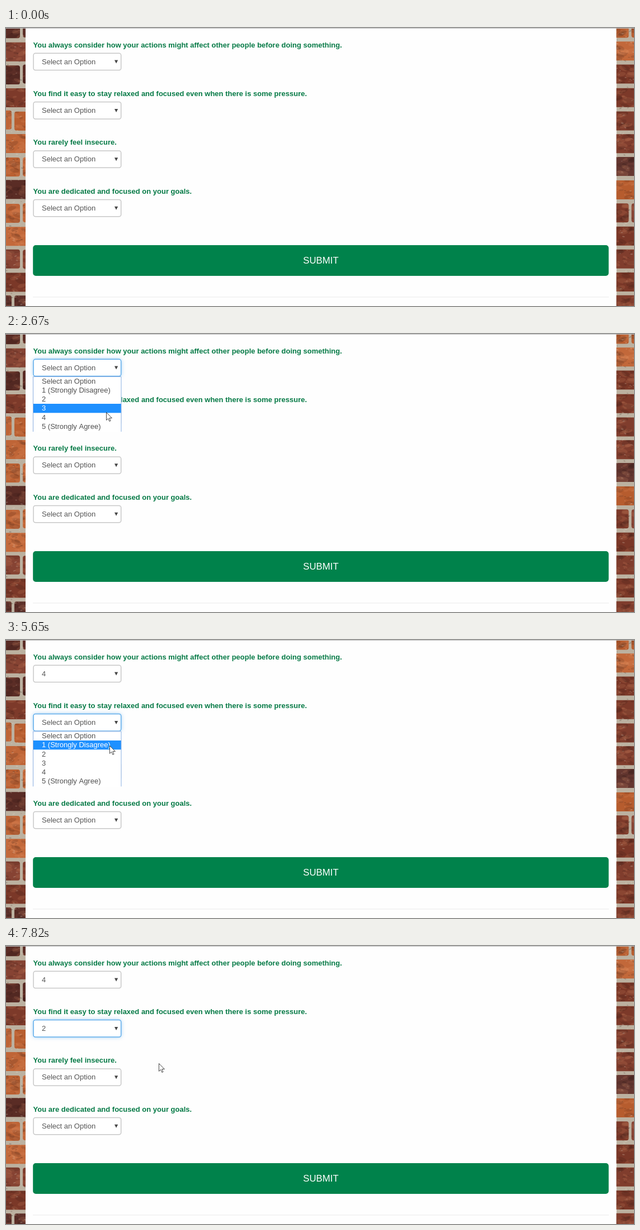
These frames come from a looping animation (1123 by 498 pixels, 8 s). An HTML page with a canvas:

```html
<!DOCTYPE html>
<html lang="en">
<head>
<meta charset="utf-8">
<title>Questionnaire</title>
<style>
html, body { margin: 0; height: 100%; overflow: hidden; background: #fefefe }
canvas { display: block }
</style>
</head>
<body>
<canvas id="stage" width="1123" height="498"></canvas>
<script>
const W = 1123, H = 498, LOOP = 8000, STEP = 80;
const ctx = document.getElementById('stage').getContext('2d');
const font = '13px "Liberation Sans", Arial, sans-serif';

const questions = [
  'You always consider how your actions might affect other people before doing something.',
  'You find it easy to stay relaxed and focused even when there is some pressure.',
  'You rarely feel insecure.',
  'You are dedicated and focused on your goals.'
];
const options = ['Select an Option', '1 (Strongly Disagree)', '2', '3', '4', '5 (Strongly Agree)'];
const rowHeight = 16.25;
const selectTop = i => 44.5 + i * 87.4;

const visits = [
  { open: 1610, close: 3450, blur: 4790, answer: 4 },
  { open: 4790, close: 7430, blur: LOOP, answer: 2 }
];

// Where the pointer turns or rests
const path = [
  { t: 180, x: 990, y: 452 },
  { t: 660, x: 310, y: -20 },
  { t: 800, x: 215, y: -20 },
  { t: 810, x: 215, y: 5 },
  { t: 1610, x: 196, y: 59 },
  { t: 1900, x: 196, y: 59 },
  { t: 2670, x: 179, y: 140 },
  { t: 3150, x: 178, y: 145 },
  { t: 4000, x: 178, y: 145 },
  { t: 4470, x: 187, y: 149 },
  { t: 5090, x: 187, y: 149 },
  { t: 6180, x: 183, y: 226 },
  { t: 6810, x: 175, y: 206 },
  { t: 7580, x: 175, y: 206 },
  { t: 7740, x: 235, y: 227 },
  { t: 7820, x: 273, y: 210 }
];

const clamp = v => Math.max(0, Math.min(1, v));
const mix = (a, b, k) => a + (b - a) * k;
const smooth = k => k * k * (3 - 2 * k);

function pointerAt(t) {
  const i = path.findLastIndex(p => p.t <= t);
  if (i < 0) return null;
  const a = path[i], b = path[i + 1] || a;
  const elapsed = Math.floor((t - a.t) / STEP) * STEP;
  const k = smooth(clamp(elapsed / (b.t - a.t || 1)));
  return { x: mix(a.x, b.x, k), y: mix(a.y, b.y, k) };
}

function text(c, string, x, y, color, style = font) {
  c.font = style;
  c.fillStyle = color;
  c.fillText(string, x, y);
}

// One letter per course: d dark, r red, o orange
const brickColors = { d: [98, 52, 45], r: [128, 61, 45], o: [190, 100, 54] };

function drawBricks(c, left, width, courses, jointAt) {
  let seed = left + 7;
  const random = () => (seed = (seed * 16807 + 11) % 2147483647) / 2147483647;
  const blotch = (color, x, y, size) => {
    c.fillStyle = color;
    c.beginPath();
    c.ellipse(x, y, size, size * 0.45, random() - 0.5, 0, 7);
    c.fill();
  };
  c.save();
  c.beginPath();
  c.rect(left, 0, width, H);
  c.clip();
  c.fillStyle = '#bcb1a0';
  c.fillRect(left, 0, width, H);
  [...courses].forEach((kind, i) => {
    const y = -17.5 + i * 41.3, joint = jointAt(i);
    const spans = joint ? [[-6, joint], [joint + 5, width + 6]] : [[-6, width + 6]];
    for (const [a, b] of spans) {
      const shade = (random() - 0.5) * 16;
      c.save();
      c.beginPath();
      c.roundRect(left + a, y + random() * 2, b - a, 34, 4);
      c.fillStyle = `rgb(${brickColors[kind].map(v => v + shade)})`;
      c.fill();
      c.clip();
      for (let n = 0; n < 14; n++)
        blotch(n % 2 ? 'rgba(30,10,10,.13)' : 'rgba(240,160,115,.13)',
          left + random() * width, y + random() * 34, 2 + random() * 9);
      c.restore();
    }
  });
  for (let n = 0; n < 120; n++)
    blotch(n % 2 ? 'rgba(60,40,30,.25)' : 'rgba(235,225,205,.25)',
      left + random() * width, random() * H, 1 + random() * 1.5);
  c.restore();
}

function drawPage(c) {
  c.fillStyle = '#fefefe';
  c.fillRect(0, 0, W, H);
  drawBricks(c, 0, 35, 'drdrooodoorrd', i => i % 2 ? 0 : i % 8 === 4 ? 10 : 25);
  drawBricks(c, 1091.5, 31.5, 'oorrrrdorrrrr', i => i % 8 ? 0 : 22);
  c.fillStyle = '#bdbdbd';
  c.fillRect(0, 0, W, 1);
  c.fillStyle = '#ececec';
  c.fillRect(48, 481.5, 1030, 1);
  questions.forEach((q, i) => text(c, q, 48.5, selectTop(i) - 10, '#067a46', 'bold ' + font));
  c.fillStyle = '#00824b';
  c.beginPath();
  c.roundRect(48.2, 389, 1029.5, 55, 5);
  c.fill();
  c.textAlign = 'center';
  text(c, 'SUBMIT', 563, 422, '#fff', font.replace('13px', '16.8px'));
  c.textAlign = 'left';
}

function drawSelect(i, value, focus) {
  const y = selectTop(i);
  const box = new Path2D();
  box.roundRect(49.1, y + 0.7, 156.6, 30.3, 3.5);
  ctx.save();
  ctx.fillStyle = '#fff';
  ctx.shadowColor = `rgba(102,175,233,${0.7 * focus})`;
  ctx.shadowBlur = 7;
  ctx.fill(box);
  ctx.restore();
  ctx.lineWidth = 1.5;
  ctx.strokeStyle = `rgb(${mix(200, 98, focus)},${mix(200, 174, focus)},${mix(200, 235, focus)})`;
  ctx.stroke(box);
  text(ctx, options[value], 64, y + 20.1, '#555');
  ctx.fillStyle = '#444';
  ctx.beginPath();
  ctx.moveTo(194, y + 13);
  ctx.lineTo(200.2, y + 13);
  ctx.lineTo(197.1, y + 19);
  ctx.fill();
}

function drawList(i, pointer) {
  const top = selectTop(i) + 32;
  const hovered = Math.max(0, Math.floor((pointer.y - top) / rowHeight));
  ctx.fillStyle = '#fff';
  ctx.fillRect(48, top - 0.5, 158.5, 99);
  ctx.fillStyle = '#1e90ff';
  ctx.fillRect(49, Math.round(top + hovered * rowHeight), 157, 16.3);
  options.forEach((option, n) =>
    text(ctx, option, 64, Math.round(top + 12.2 + n * rowHeight), n === hovered ? '#fff' : '#505050'));
  ctx.strokeStyle = '#8aaee0';
  ctx.lineWidth = 1;
  ctx.beginPath();
  ctx.moveTo(48.5, top + 98.5);
  ctx.lineTo(48.5, top);
  ctx.lineTo(206, top);
  ctx.lineTo(206, top + 98.5);
  ctx.stroke();
}

const arrow = new Path2D('M.5 .5V14.4L3.7 11.4L5.9 16.4L8 15.5L5.9 10.6H10.4Z');

function drawPointer({ x, y }) {
  ctx.save();
  ctx.translate(Math.round(x), Math.round(y));
  ctx.fillStyle = '#fff';
  ctx.fill(arrow);
  ctx.strokeStyle = '#333';
  ctx.lineWidth = 0.9;
  ctx.stroke(arrow);
  ctx.restore();
}

const page = document.createElement('canvas');
page.width = W;
page.height = H;
drawPage(page.getContext('2d'));

function draw() {
  const t = performance.now() % LOOP, pointer = pointerAt(t);
  ctx.drawImage(page, 0, 0);
  questions.forEach((_, i) => {
    const v = visits[i];
    const focus = v ? clamp((t - v.open) / 150) - clamp((t - v.blur) / 150) : 0;
    drawSelect(i, v && t >= v.close + STEP ? v.answer : 0, focus);
  });
  visits.forEach((v, i) => {
    if (t >= v.open && t < v.close) drawList(i, pointer);
  });
  if (pointer) drawPointer(pointer);
  requestAnimationFrame(draw);
}
requestAnimationFrame(draw);
</script>
</body>
</html>
```
